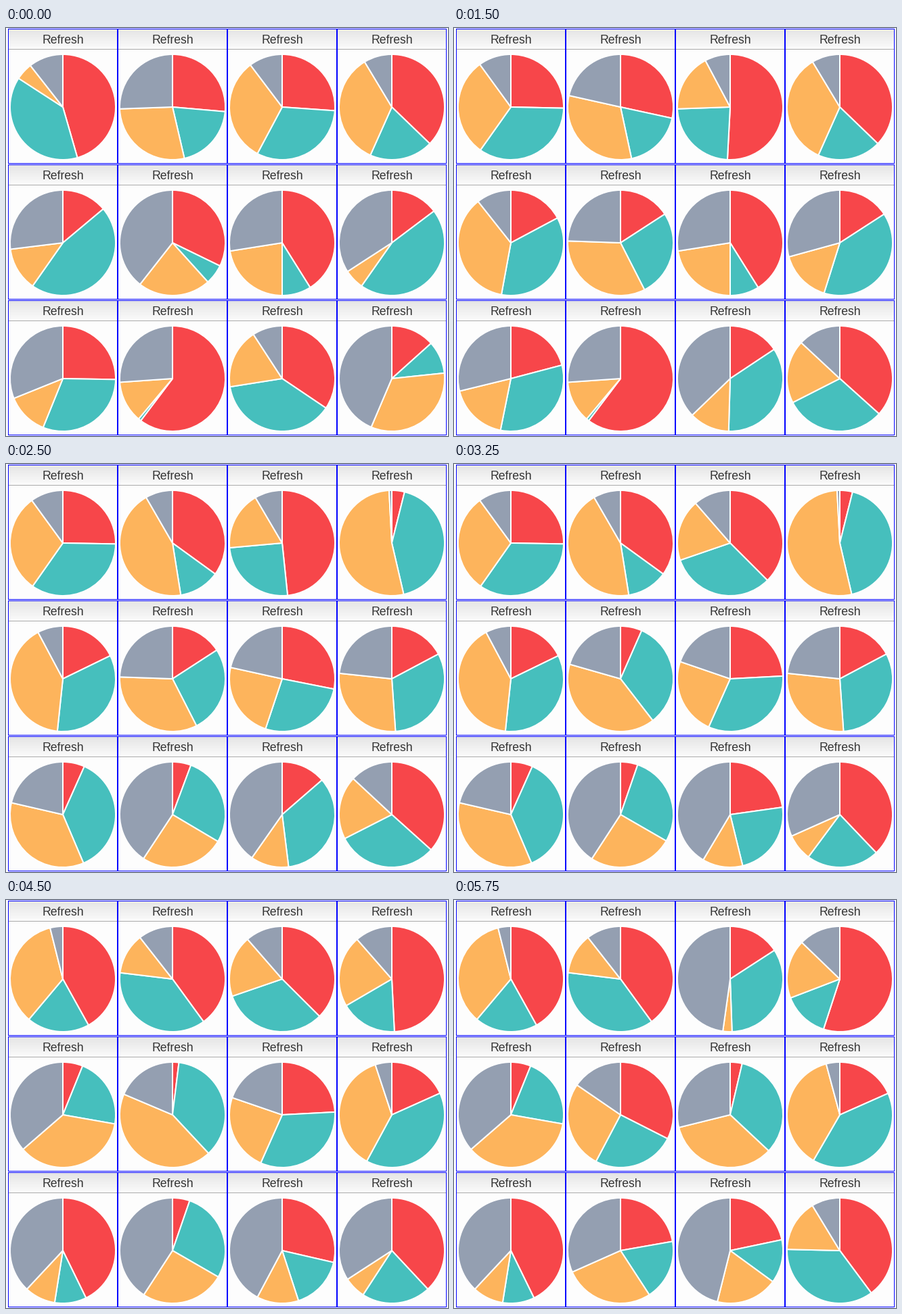
Write a matplotlib script that moves like this. It is 653x604 px and loops after 6 s.

```python
import numpy as np
import matplotlib.pyplot as plt
from matplotlib.animation import FuncAnimation
from matplotlib.patches import Rectangle, Wedge

W, H, DPI = 653, 604, 100
FRAMES, STEP = 24, 250
EASE_MS = 1000
COLS = 4
CELL_W, CELL_H = 162, 201
RADIUS = 78
COLORS = ("#F7464A", "#46BFBD", "#FDB45C", "#949FB1")
BLUE = "#0000ff"


def px(n):
    return n * 72 / DPI


fig = plt.figure(figsize=(W / DPI, H / DPI), dpi=DPI, facecolor="white")
ax = fig.add_axes([0, 0, 1, 1])
ax.axis("off")


def box(x, y, w, h, color):
    ax.add_patch(Rectangle((x, y), w, h, facecolor=color, linewidth=0,
                           antialiased=False, zorder=1))


def cell(x, y):
    box(x, y, CELL_W, 200, BLUE)
    box(x + 1, y + 1, CELL_W - 2, 198, "#fdfdfd")
    shade = np.linspace(0.895, 0.98, 29).reshape(-1, 1)
    ax.imshow(shade, cmap="gray", vmin=0, vmax=1, aspect="auto", zorder=2,
              extent=(x + 1, x + CELL_W - 1, y + 30, y + 1))
    box(x + 1, y + 30, CELL_W - 2, 1, "#ababab")
    ax.text(x + 81, y + 22, "Refresh", fontsize=px(17.6), color="#333333",
            family="Liberation Sans", ha="center", va="baseline", zorder=3)


def ease_out(p):
    return 1 - (1 - min(max(p, 0), 1)) ** 4


class Pie:
    """Goes to its next pose at `first` ms and then once every `period` ms.

    A pose holds the ends of the first three slices, in degrees from the top.
    """

    count = 0

    def __init__(self, first, period, *poses):
        row, col = divmod(Pie.count, COLS)
        Pie.count += 1
        x, y = 3 + CELL_W * col, 1 + CELL_H * row
        cell(x, y)
        self.first, self.period = first, period
        self.poses = np.array(poses, float)
        self.slices = [
            ax.add_patch(Wedge((x + 81, y + 116), RADIUS, 0, 1, facecolor=c,
                               edgecolor="white", linewidth=px(2),
                               joinstyle="bevel", zorder=4 + i / 10))
            for i, c in enumerate(COLORS)]

    def draw(self, ms):
        ends = self.poses[0]
        for k, goal in enumerate(self.poses[1:]):
            start = self.first + k * self.period
            ends = ends + (goal - ends) * ease_out((ms - start) / EASE_MS)
        edges = [0, *ends, 360]
        for s, a, b in zip(self.slices, edges, edges[1:]):
            s.set_theta1(a - 90)
            s.set_theta2(b - 90)


# Left to right, top to bottom.
pies = [
    Pie(734, 2842, (164, 303, 322), (91, 215, 324), (151, 220, 346)),
    Pie(1435, 2250, (95, 167, 268), (126, 171, 330), (144, 277, 322)),
    Pie(375, 2075, (94, 208, 323), (183, 268, 332), (135, 251, 319),
        (57, 178, 188)),
    Pie(1560, 2520, (134, 204, 329), (14, 167, 357), (198, 249, 314)),

    Pie(1122, 2358, (50, 215, 263), (64, 186, 332), (22, 100, 229)),
    Pie(420, 2590, (116, 138, 218), (57, 153, 272), (7, 137, 293),
        (237, 285, 317)),
    Pie(2195, 2774, (148, 180, 261), (87, 204, 289), (13, 133, 256)),
    Pie(1361, 2605, (53, 215, 237), (62, 176, 276), (66, 210, 345)),

    Pie(1435, 2113, (91, 202, 248), (24, 157, 283), (154, 189, 223)),
    Pie(1790, 2948, (217, 220, 266), (19, 120, 213), (80, 147, 246)),
    Pie(1060, 1980, (124, 261, 327), (49, 173, 215), (103, 162, 208),
        (78, 126, 194)),
    Pie(401, 2435, (48, 84, 203), (132, 243, 313), (137, 213, 237),
        (144, 276, 336)),
]

ax.set_xlim(0, W)
ax.set_ylim(H, 0)


def update(frame):
    for pie in pies:
        pie.draw(frame * STEP)
    return []


def reset():
    return update(0)


anim = FuncAnimation(fig, update, frames=FRAMES, interval=STEP,
                     init_func=reset, repeat=True, repeat_delay=0)
plt.show()
```
